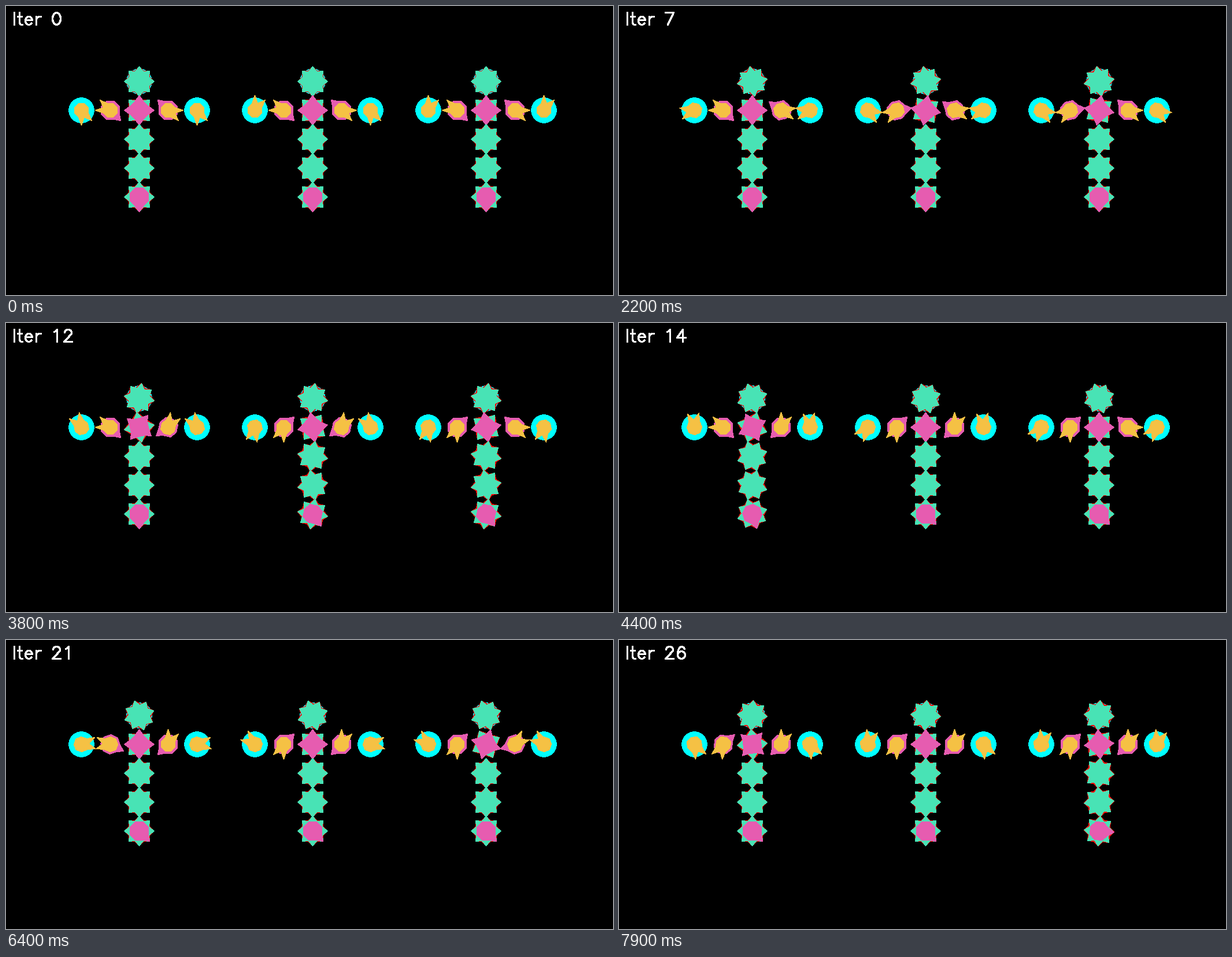
Animation of 1050x500 px, one loop 8 s. Source, as a matplotlib script:

```python
import numpy as np
import matplotlib.pyplot as plt
from matplotlib.animation import FuncAnimation
from matplotlib.patches import Circle, Polygon

W, H, DPI = 1050, 500, 100
FRAMES, INTERVAL = 80, 100
STEP = 360 / FRAMES
PX = 72 / DPI

CYAN, RED, TEAL = "#00ffff", "#ff0000", "#48e3b5"
PINK, YELLOW = "#e65cb0", "#f5c144"
TIP = 26
ROOT = {RED: 20, TEAL: 18, PINK: 17, YELLOW: 13.4}
ALL, DIAGONAL, CARDINAL = range(8), (1, 3, 5, 7), (0, 2, 4, 6)

# Cell x, then the phases of its left and right input gears
CELLS = [(230, 135, 135), (530, 0, 135), (830, 0, 0)]

fig = plt.figure(figsize=(W / DPI, H / DPI), dpi=DPI, facecolor="black")
ax = fig.add_axes([0, 0, 1, 1])
ax.set_xlim(0, W)
ax.set_ylim(H, 0)
ax.axis("off")


def style(color):
    return dict(facecolor=color, edgecolor="none", linewidth=0,
                antialiased=False, snap=False)


def outline(x, y, root, teeth, angle):
    """Eight-sided body with pointed teeth; angles run clockwise from up."""
    points = []
    for k in range(8):
        if k in teeth:
            points.append((TIP, angle + 45 * k))
        points.append((root, angle + 45 * k + 22.5))
    radius, deg = np.array(points).T
    a = np.radians(deg)
    xy = np.column_stack([x + radius * np.sin(a), y - radius * np.cos(a)])
    return np.round(xy) + 0.5


def ramp(turn, start, span):
    return min(max(turn - start, 0), span)


parts = []


def disc(x, y):
    ax.add_patch(Circle((x + 0.5, y + 0.5), 21.7, **style(CYAN)))


def gear(x, y, angle, *layers):
    """Stack layers of (color, teeth), all turned by angle(turn)."""
    for color, teeth in layers:
        shape = ax.add_patch(Polygon(outline(x, y, ROOT[color], teeth, 0),
                                     **style(color)))
        parts.append((shape, x, y, ROOT[color], teeth, angle))


def build_cell(x, left, right):
    y = 180
    l_start = (45 - left) % 360
    r_start = (225 - right) % 360

    pushes = []
    for s in sorted([l_start + 45, r_start + 45]):
        if not pushes or s - pushes[-1] >= 90:
            pushes.append(s)

    def center(t):
        return sum(ramp(t, s, 90) for s in pushes)

    def carry(t):
        return sum(ramp(t, s + 45, 45) for s in pushes)

    for dx, phase in ((-100, left), (100, right)):
        disc(x + dx, y)
        gear(x + dx, y, lambda t, p=phase: p + t, (YELLOW, (0, 1)))

    gear(x - 50, y, lambda t: -ramp(t, l_start, 90),
         (PINK, (3,)), (YELLOW, (6, 7)))
    gear(x + 50, y, lambda t: -ramp(t, r_start, 90),
         (PINK, (7,)), (YELLOW, (2, 3)))

    full = (RED, ALL), (TEAL, ALL)
    disc(x, y - 50)
    gear(x, y - 50, lambda t: -t, *full)
    gear(x, y, center, (RED, DIAGONAL), (TEAL, DIAGONAL), (PINK, CARDINAL))
    gear(x, y + 50, lambda t: -carry(t), *full)
    gear(x, y + 100, carry, *full)
    gear(x, y + 150, lambda t: -carry(t), *full, (PINK, (4,)))


for cell in CELLS:
    build_cell(*cell)


# Single-stroke lettering, 21 units tall, y upward from the baseline
def arc(cx, cy, rx, ry, a0, a1):
    a = np.radians(np.linspace(a0, a1, 17))
    return list(zip(cx + rx * np.cos(a), cy + ry * np.sin(a)))


SIX = [arc(11, 8, 7, 13, 45, 180), arc(10.5, 6.5, 6.5, 6.5, 0, 360)]
GLYPHS = {
    " ": (16, []),
    "I": (8, [[(4, 21), (4, 0)]]),
    "t": (12, [[(5, 21), (5, 4), (6, 1), (8, 0), (10, 0)],
               [(2, 14), (9, 14)]]),
    "e": (18, [[(3, 8)] + arc(9, 7, 6, 7, 8, 320)]),
    "r": (13, [[(4, 14), (4, 0)],
               arc(9.5, 8, 5.5, 6, 180, 90) + [(12, 14)]]),
    "0": (20, [arc(10, 10.5, 7, 10.5, 0, 360)]),
    "1": (20, [[(6, 17), (8, 18), (11, 21), (11, 0)]]),
    "2": (20, [arc(10, 15.5, 6, 5.5, 175, -25) + [(3, 0), (17, 0)]]),
    "3": (20, [[(5, 21), (16, 21), (10, 13)]
               + arc(10, 6.5, 7, 6.5, 80, -160)]),
    "4": (20, [[(13, 0), (13, 21), (3, 7), (18, 7)]]),
    "5": (20, [[(15, 21), (5, 21), (4, 12)] + arc(10, 7, 7, 7, 135, -155)]),
    "6": (20, SIX),
    "7": (20, [[(3, 21), (17, 21), (7, 0)]]),
    "8": (20, [arc(10, 16.7, 6, 4.3, 0, 360),
               arc(10, 6.2, 7, 6.2, 0, 360)]),
    "9": (20, [[(20 - px, 21 - py) for px, py in s] for s in SIX]),
}


def write(text, x, base):
    xs, ys = [], []
    for ch in text:
        advance, strokes = GLYPHS[ch]
        for stroke in strokes:
            for px, py in stroke:
                xs.append(x + px + 0.5)
                ys.append(base - py + 0.5)
            xs.append(np.nan)
            ys.append(np.nan)
        x += advance
    return xs, ys


label, = ax.plot([], [], color="white", linewidth=2.2 * PX,
                 antialiased=False, solid_capstyle="round",
                 solid_joinstyle="round", snap=False)


def draw(i):
    turn = i * STEP
    for shape, x, y, root, teeth, angle in parts:
        shape.set_xy(outline(x, y, root, teeth, angle(turn)))
    label.set_data(*write(f"Iter {i // 3}", 10, 32))
    return [p[0] for p in parts] + [label]


anim = FuncAnimation(fig, draw, frames=FRAMES, interval=INTERVAL,
                     repeat=True, repeat_delay=0, blit=False)
plt.show()
```
